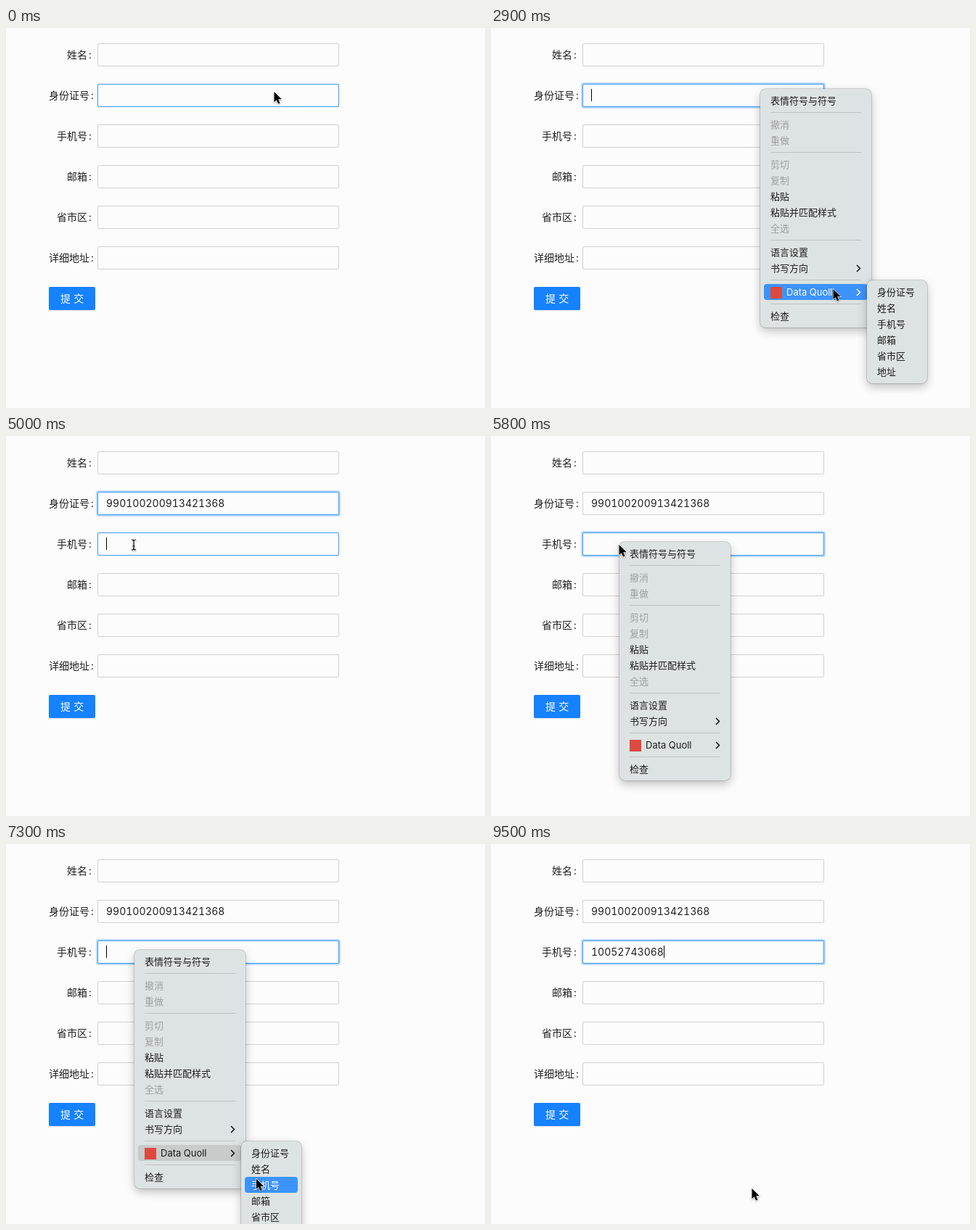
Write an HTML page that moves like this. It is 660 px wide and 524 px high and loops after 9.6 s.

```html
<!DOCTYPE html>
<html lang="zh-CN">
<head>
<meta charset="utf-8">
<title>表单填充</title>
<style>
html, body { margin: 0; width: 100%; height: 100%; overflow: hidden; }
body { background: #fcfcfc; }
#stage {
  position: relative; width: 660px; height: 524px; overflow: hidden;
  background: #fcfcfc; color: rgba(0,0,0,.88); cursor: none;
  font: 14px/32px Inter, "Noto Sans CJK SC", "Noto Sans CJK", sans-serif;
  font-variant-numeric: tabular-nums; white-space: nowrap;
}
#stage * { box-sizing: border-box; }
.label, .field, .button, .menu, #popup, #cursor { position: absolute; }
.label::after { content: ":"; margin-left: 2px; }
.field {
  left: 126px; width: 333px; height: 32px; padding-left: 11px;
  border: 1px solid #d0d0d0; border-radius: 2px; line-height: 30px;
}
.field::before, .field::after { content: ""; position: absolute; inset: -1px; border-radius: 2px; }
.field::before { border: 1px solid #3c98f4; opacity: var(--edge, 0); }
.field::after { box-shadow: 0 0 0 2px rgba(24,144,255,.3); opacity: var(--glow, 0); }
.caret { display: inline-block; width: 1px; height: 17px; background: #000; vertical-align: -3px; }
.button {
  left: 59px; top: 357px; width: 64px; height: 32px; padding-left: 16px;
  background: #1682ff; color: #fff; border-radius: 2px; letter-spacing: 4.2px;
  box-shadow: 0 2px 0 rgba(0,0,0,.045);
}
#popup { left: 0; top: 0; }
.menu {
  padding: 5px; border-radius: 7px; background: #dde3e2; font-size: 13px; line-height: 22px;
  box-shadow: 0 0 0 .5px rgba(0,0,0,.3), 0 5px 13px rgba(0,0,0,.24);
}
#main { width: 153px; height: 329px; }
#sub { left: 147px; top: 264px; width: 83px; height: 142px; }
.item { position: relative; height: 22px; padding-left: 9px; border-radius: 4px; }
.item.off { color: rgba(0,0,0,.29); }
.item.trail { background: rgba(0,0,0,.1); }
.item.hot { background: #3c93fb; color: #fff; }
.line { height: 11px; padding: 5px 9px; }
.line::after { content: ""; display: block; height: 1px; background: #bdc3c2; }
.badge { display: inline-block; width: 16px; height: 16px; margin-right: 6px; background: #dc4a40; vertical-align: -4px; }
.item svg { position: absolute; right: 9px; top: 6px; fill: none; stroke: currentColor; stroke-width: 1.7; stroke-linecap: round; stroke-linejoin: round; }
#cursor { left: 0; top: 0; overflow: visible; filter: drop-shadow(0 1px 1px rgba(0,0,0,.3)); }
</style>
</head>
<body>
<div id="stage">
  <div class="button">提交</div>
  <div id="popup">
    <div class="menu" id="main"></div>
    <div class="menu" id="sub"></div>
  </div>
  <svg id="cursor" width="12" height="18">
    <path id="arrow" d="M.5 0V14.2L3.7 11.3 6 16.6 8.5 15.5 6.2 10.3H10.8Z" stroke="#fff" stroke-width="1.2" paint-order="stroke"/>
    <g id="beam" fill="none">
      <path d="M-3-7Q0-7 0-5Q0-7 3-7M0-5V5M-3 7Q0 7 0 5Q0 7 3 7M-1.5 2H1.5" stroke="#fff" stroke-width="2.6"/>
      <path d="M-3-7Q0-7 0-5Q0-7 3-7M0-5V5M-3 7Q0 7 0 5Q0 7 3 7M-1.5 2H1.5" stroke="#000" stroke-width="1.2"/>
    </g>
  </svg>
</div>
<script>
const LOOP = 9600;
const $ = id => document.getElementById(id);
const stage = $("stage"), popup = $("popup"), main = $("main"), sub = $("sub");

function add(parent, cls, html = "") {
  const el = document.createElement("div");
  el.className = cls;
  el.innerHTML = html;
  parent.append(el);
  return el;
}

// Form
const fields = ["姓名", "身份证号", "手机号", "邮箱", "省市区", "详细地址"].map((name, i) => {
  const top = 21 + 56 * i + "px";
  const label = add(stage, "label", name);
  label.style.top = top;
  label.style.left = (name.length > 3 ? 59 : 112 - 14 * name.length) + "px";
  const el = add(stage, "field", '<span></span><i class="caret"></i>');
  el.style.top = top;
  return { el, text: el.firstChild, caret: el.lastChild };
});
const [, idField, phoneField] = fields;
stage.append(popup, $("cursor"));

// Menus: "|" is a divider, "-" a disabled row, ">" a row with a submenu
function fill(menu, rows) {
  let y = 5;
  return rows.map(row => {
    if (row === "|") { add(menu, "line"); y += 11; return null; }
    const off = row[0] === "-", more = row[0] === ">";
    const chevron = more ? '<svg width="7" height="11"><path d="M1.5 1.5 5.5 5.5 1.5 9.5"/></svg>' : "";
    const el = add(menu, off ? "item off" : "item", row.replace(/^[->]/, "") + chevron);
    y += 22;
    return { el, off, top: y - 22 };
  }).filter(Boolean);
}
const mainRows = fill(main, ["表情符号与符号", "|", "-撤消", "-重做", "|", "-剪切", "-复制", "粘贴", "粘贴并匹配样式",
  "-全选", "|", "语言设置", ">书写方向", "|", '><i class="badge"></i>Data Quoll', "|", "检查"]);
const subRows = fill(sub, ["身份证号", "姓名", "手机号", "邮箱", "省市区", "地址"]);
const parentRow = mainRows[mainRows.length - 2];

// Each session: where the menu opens and when its phases happen
const sessions = [
  { x: 371, y: 84, open: 1880, sub: 2860, pick: 3690, fade: 4000, end: 4290 },
  { x: 177, y: 146, open: 5780, sub: 6900, pick: 7780, fade: 8050, end: 8385 }
];

// Pointer path: time, x, y
const path = [
  [0, 369, 88], [2200, 369, 88], [2740, 471, 360], [3150, 471, 360], [3480, 548, 365], [4290, 548, 365],
  [4780, 176, 150], [5880, 176, 150], [6470, 277, 440], [6600, 277, 440], [6760, 281, 430], [6980, 281, 430],
  [7390, 353, 466], [7590, 359, 475], [LOOP, 359, 475]
];

const ramp = (t, a, b) => Math.min(1, Math.max(0, (t - a) / (b - a)));
const ease = k => k * k * (3 - 2 * k);
const within = (t, a, b) => t >= a && t < b;

function pointer(t) {
  const i = path.findIndex(p => p[0] > t);
  const [t0, x0, y0] = path[i - 1], [t1, x1, y1] = path[i];
  const k = ease(ramp(t, t0, t1));
  return [x0 + (x1 - x0) * k, y0 + (y1 - y0) * k];
}

const rowAt = (rows, y) => rows.find(r => !r.off && within(y, r.top, r.top + 22));

function drawMenu(t, px, py) {
  const s = sessions.find(s => within(t, s.open, s.end));
  popup.style.display = s ? "" : "none";
  if (!s) return;
  popup.style.transform = `translate(${s.x}px,${s.y}px)`;
  popup.style.opacity = 1 - ramp(t, s.fade, s.end);
  const subOpen = t >= s.sub, x = px - s.x, y = py - s.y;
  sub.style.display = subOpen ? "" : "none";

  let hot = null;
  if (subOpen && within(x, 147, 230)) hot = rowAt(subRows, y - 264);
  else if (within(x, 0, 153)) hot = rowAt(mainRows, y);
  if (subOpen && mainRows.includes(hot) && hot !== parentRow) hot = null;
  if (within(t, s.pick, s.pick + 100)) hot = null;
  for (const r of [...mainRows, ...subRows]) r.el.classList.toggle("hot", r === hot);
  parentRow.el.classList.toggle("trail", subOpen && hot !== parentRow);
}

function drawField(f, edge, glow, text, caret) {
  f.el.style.setProperty("--edge", edge);
  f.el.style.setProperty("--glow", glow);
  if (f.text.textContent !== text) f.text.textContent = text;
  f.caret.style.display = caret ? "" : "none";
}

function drawPointer(t, x, y) {
  const menuOpen = sessions.some(s => within(t, s.open, s.end));
  const inField = within(x, 126, 459) && y < 333 && within((y - 21) % 56, 0, 32);
  const beam = t >= 290 && !menuOpen && inField;
  $("arrow").style.display = beam ? "none" : "";
  $("beam").style.display = beam ? "" : "none";
  $("cursor").style.transform = `translate(${x}px,${y}px)`;
}

function frame(now) {
  const t = now % LOOP;
  const [x, y] = pointer(t);
  const swap = ramp(t, 5000, 5290);
  drawField(idField, 1 - swap, ramp(t, 1170, 1480) * (1 - swap),
    t < 4290 ? "" : "990100200913421368",
    within(t, 1180, 1690) || within(t, 2190, 4885));
  drawField(phoneField, ramp(t, 4650, 4900), swap,
    t < 8385 ? "" : "10052743068",
    within(t, 4885, 5390) || t >= 5885);
  drawMenu(t, x, y);
  drawPointer(t, x, y);
  requestAnimationFrame(() => frame(performance.now() - start));
}
for (const f of fields) drawField(f, 0, 0, "", false);
const start = performance.now();
frame(0);
</script>
</body>
</html>
```
